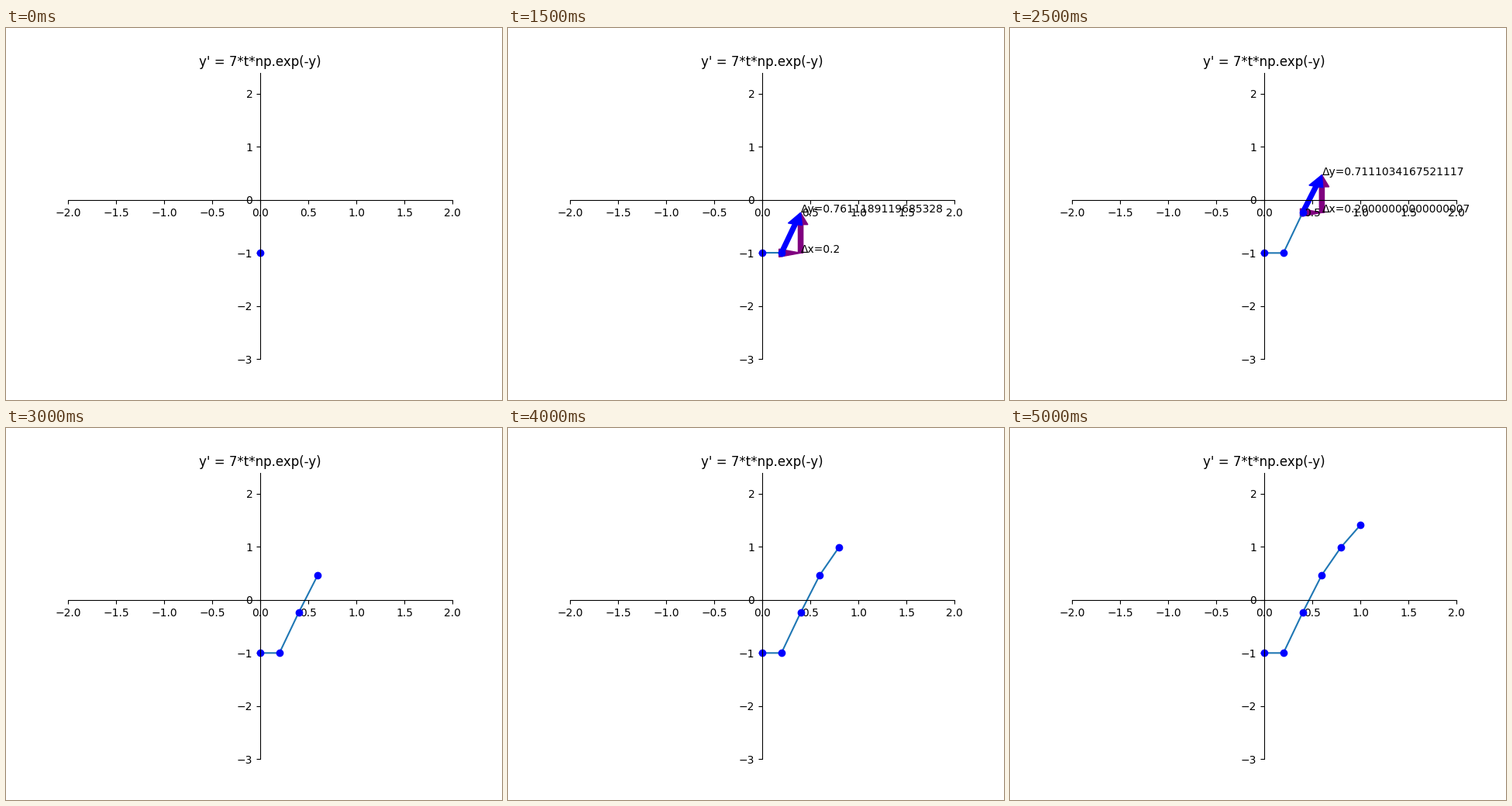
Write a matplotlib script that moves like this. It is 640x480 px and loops after 5500 ms.

```python
import math

import matplotlib.pyplot as plt
from matplotlib.animation import FuncAnimation

STEPS = 5
H = 0.2
HOLD = 500  # ms per picture


def slope(t, y):
    return 7 * t * math.exp(-y)


def euler(t, y):
    ts, ys = [t], [y]
    for _ in range(STEPS):
        y += H * slope(t, y)
        t += H
        ts.append(t)
        ys.append(y)
    return ts, ys


ts, ys = euler(0.0, -1.0)

plt.rcParams["font.family"] = "DejaVu Sans"
fig, ax = plt.subplots(figsize=(6.4, 4.8), dpi=100)
ax.set_xlim(-2, 2)
ax.set_ylim(-3, 2.4)
ax.set_title("y' = 7*t*np.exp(-y)")
for side in ("left", "bottom"):
    ax.spines[side].set_position("zero")
for side in ("right", "top"):
    ax.spines[side].set_color("none")

path, = ax.plot([], [])
dots, = ax.plot([], [], "bo")
extras = []


def arrow(x, y, dx, dy, color):
    if dx or dy:
        extras.append(ax.arrow(x, y, dx, dy, width=0.05, color=color,
                               length_includes_head=True))


def show_step(k):
    x, y = ts[k], ys[k]
    x1, y1 = ts[k + 1], ys[k + 1]
    dx, dy = x1 - x, y1 - y
    arrow(x, y, dx, 0, "purple")
    arrow(x1, y, 0, dy, "purple")
    arrow(x, y, dx, dy, "blue")
    extras.append(ax.text(x1, y, f"Δx={dx}"))
    extras.append(ax.text(x1, y1, f"Δy={dy}"))


def update(i):
    while extras:
        extras.pop().remove()
    k, stepping = divmod(i, 2)
    path.set_data(ts[:k + 1], ys[:k + 1])
    dots.set_data(ts[:k + 1], ys[:k + 1])
    if stepping:
        show_step(k)
    return [path, dots, *extras]


anim = FuncAnimation(fig, update, frames=2 * STEPS + 1, interval=HOLD,
                     repeat=True, repeat_delay=0, blit=False)
plt.show()
```
